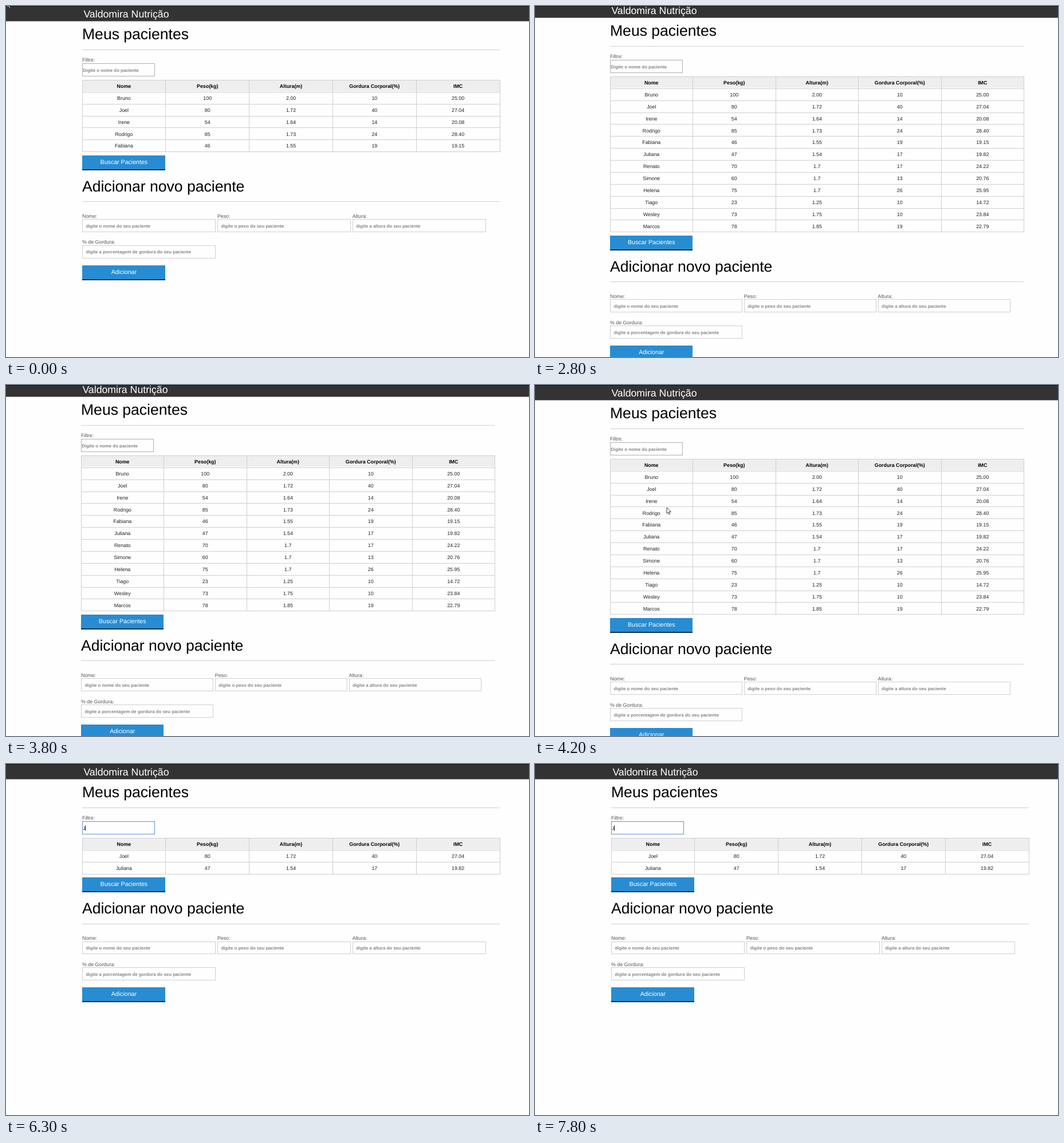
An HTML page for the animation above (8 s loop, 913 by 613 pixels).

```html
<!DOCTYPE html>
<html lang="pt-BR">
<head>
<meta charset="utf-8">
<title>Meus pacientes</title>
<style>
html, body { margin: 0; width: 913px; height: 613px; overflow: hidden; background: #fefefe; }
svg { display: block; }
text { font: 8.85px "Liberation Sans", Arial, sans-serif; text-rendering: geometricPrecision; white-space: pre; }
.mid { text-anchor: middle; }
.head { font-weight: bold; }
.title { font-size: 17.7px; }
.big { font-size: 26.56px; }
.btn { font-size: 10.62px; text-anchor: middle; }
.hint { font-size: 7.85px; font-weight: bold; }
</style>
</head>
<body>
<svg id="stage" width="913" height="613"></svg>
<script>
const LOOP = 8000, ROW = 20.88, TABLE_TOP = 129.4;
const LINE = '#cfcfcf', HINT = '#868686';
const columns = ['Nome', 'Peso(kg)', 'Altura(m)', 'Gordura Corporal(%)', 'IMC'];
const patients = `Bruno 100 2.00 10 25.00
Joel 80 1.72 40 27.04
Irene 54 1.64 14 20.08
Rodrigo 85 1.73 24 28.40
Fabiana 46 1.55 19 19.15
Juliana 47 1.54 17 19.82
Renato 70 1.7 17 24.22
Simone 60 1.7 13 20.76
Helena 75 1.7 26 25.95
Tiago 23 1.25 10 14.72
Wesley 73 1.75 10 23.84
Marcos 78 1.85 19 22.79`.split('\n').map(line => line.split(' '));

const text = (s, x, y, cls = '', fill = '#111') =>
  `<text x="${x}" y="${y}" class="${cls}" fill="${fill}">${s}</text>`;

const rect = (x, y, w, h, fill) =>
  `<rect x="${x}" y="${y}" width="${w}" height="${h}" fill="${fill}"/>`;

// One pixel lines, snapped to the pixel grid
const hline = (x, y, w) => rect(x, Math.floor(y), Math.floor(w), 1, LINE);
const vline = (x, y, h) => rect(Math.floor(x), Math.floor(y), 1, Math.floor(h), LINE);

// Box with a one pixel border, snapped to the pixel grid
function box(x, y, w, h, border) {
  const l = Math.round(x), t = Math.round(y);
  const r = Math.round(x + w), b = Math.round(y + h);
  return rect(l, t, r - l, b - t, border) + rect(l + 1, t + 1, r - l - 2, b - t - 2, '#fefefe');
}

function button(label, x, y, w) {
  const top = Math.floor(y), width = Math.floor(w);
  return rect(x, top, width, 24, '#288cd2') + rect(x, top + 24, width, 2, '#15304a') +
    text(label, x + w / 2, y + 14.8, 'btn', '#fff');
}

const field = (label, hint, x, y, w) =>
  text(label, x, y - 2.7, '', '#555') + box(x, y, w, 22.6, LINE) +
  text(hint, x + 6.5, y + 14.3, 'hint', HINT);

function table(rows, x, w) {
  const col = w / 5, height = ROW * (rows.length + 1);
  let out = rect(x, Math.floor(TABLE_TOP), Math.floor(w), Math.floor(ROW), '#eee');
  [columns, ...rows].forEach((cells, r) => {
    const y = TABLE_TOP + r * ROW;
    out += hline(x, y, w + 1);
    cells.forEach((cell, c) => {
      out += text(cell, x + (c + 0.5) * col, y + 13.6,
        r ? 'mid' : 'mid head', r ? '#222' : '#000');
    });
  });
  out += hline(x, TABLE_TOP + height, w + 1);
  for (let c = 0; c < 6; c++) out += vline(x + c * col, TABLE_TOP, height + 1);
  return out;
}

function form(x, y, w) {
  const fw = w * 0.32, step = fw + 2.6;
  return text('Adicionar novo paciente', x, y + 62.6, 'big', '#000') +
    hline(x, y + 80.5, w) +
    field('Nome:', 'digite o nome do seu paciente', x, y + 111, fw) +
    field('Peso:', 'digite o peso do seu paciente', x + step, y + 111, fw) +
    field('Altura:', 'digite a altura do seu paciente', x + 2 * step, y + 111, fw) +
    field('% de Gordura:', 'digite a porcentagem de gordura do seu paciente', x, y + 156.8, fw) +
    button('Adicionar', x, y + 192, w / 5);
}

// Value of the last [time, value] step reached
const stepAt = (steps, t) => steps.reduce((v, s) => t >= s[0] ? s[1] : v, steps[0][1]);

const scrollSteps = [[0, 0], [2800, 6], [2900, 13], [3000, 17], [3800, 6], [3900, 0]];
const querySteps = [[0, ''], [6200, 'J'], [6800, 'Jo'], [7500, 'J']];
const caretSteps = [[0, 0], [4900, 1], [5300, 0], [5800, 1], [7300, 0], [7800, 1]];
const pointerSteps = [[4100, [207, 297]], [4200, [230, 214]], [4300, [252, 132]]];
const beamSteps = [[4500, [253, 115]], [4600, [250, 108]]];

function pointer(t) {
  if (t >= 4900 || (t >= 2800 && t < 4100)) return '';
  if (t >= 4500) {
    const [x, y] = stepAt(beamSteps, t);
    return `<path d="M${x - 2} ${y - 5.5}h4m-2 0v11m-2 0h4" fill="none" stroke="#000" stroke-width=".8"/>`;
  }
  let x, y;
  if (t >= 4100) [x, y] = stepAt(pointerSteps, t);
  else {
    const k = Math.min(1, Math.max(0, (Math.floor(t / 100) - 2) / 6));
    const e = k * k * (3 - 2 * k);
    x = 2 + 198 * e;
    y = -8 + 286.5 * e;
  }
  return `<path transform="translate(${x} ${y})" d="M0 0V10.4L2.4 8.2L4 12L5.7 11.3L4.1 7.6H7.4Z"
    fill="#fff" stroke="#111" stroke-width=".8"/>`;
}

function draw(t) {
  const query = stepAt(querySteps, t);
  const loaded = t >= 2100 ? patients : patients.slice(0, 5);
  const rows = loaded.filter(p => p[0].startsWith(query));
  const narrow = rows.length > 5; // the scrollbar takes some width
  const x = narrow ? 131 : 133, w = narrow ? 722.5 : 729;
  const buttonY = TABLE_TOP + ROW * (rows.length + 1) + 6.6;
  const caretX = x + [1, 5, 10][query.length];
  return `<g transform="translate(0 ${-stepAt(scrollSteps, t)})">` +
    rect(0, 0, 913, 26.6, '#333') +
    text('Valdomira Nutrição', x + 2.4, 19.8, 'title', '#fff') +
    text('Meus pacientes', x, 58, 'big', '#000') +
    hline(x, 76, w) +
    text('Filtre:', x, 97.2, '', '#555') +
    box(x, 100, 126.6, 22.8, t >= 4900 ? '#5d8fe0' : '#b0b0b0') +
    text(query || 'Digite o nome do paciente', x + 1.3, 114.7, 'hint', query ? '#555' : HINT) +
    (stepAt(caretSteps, t) ? rect(caretX, 107, 1, 10, '#333') : '') +
    table(rows, x, w) +
    button('Buscar Pacientes', x, buttonY, w / 5) +
    form(x, buttonY, w) +
    '</g>' + rect(0, 0, 913, 1, '#111') + pointer(t);
}

const stage = document.getElementById('stage');
let shown = '';
function tick() {
  const next = draw(performance.now() % LOOP);
  if (next !== shown) stage.innerHTML = shown = next;
  requestAnimationFrame(tick);
}
tick();
</script>
</body>
</html>
```
